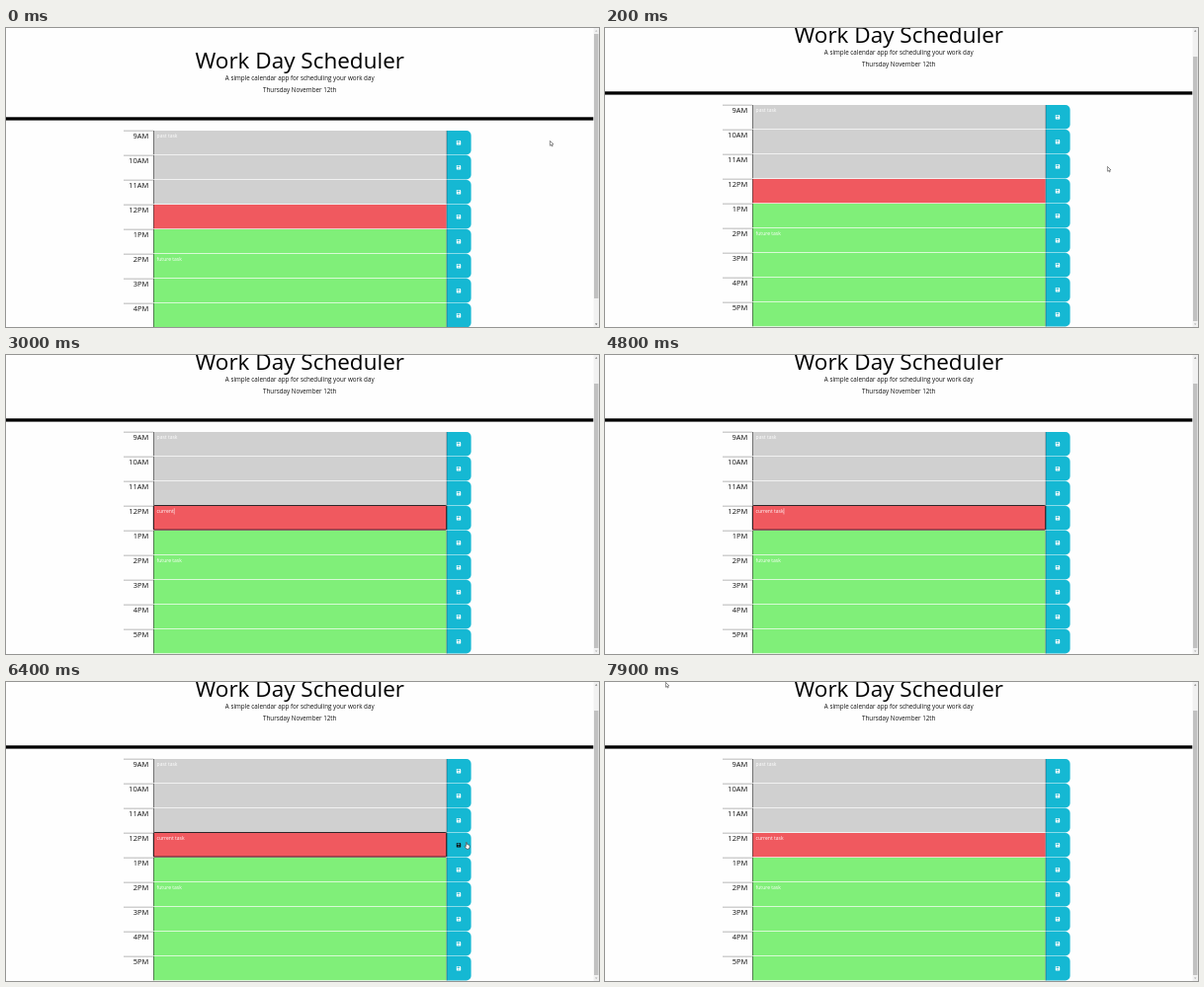
These frames come from a looping animation (600 by 303 pixels, 8000 ms). An HTML page with a canvas:

```html
<!DOCTYPE html>
<html lang="en">
<head>
<meta charset="utf-8">
<title>Work Day Scheduler</title>
<style>
  html, body { margin: 0; width: 100%; height: 100%; overflow: hidden; background: #fefefe; }
  canvas { display: block; width: 600px; height: 303px; }
</style>
</head>
<body>
<canvas id="stage"></canvas>
<script>
const W = 600, H = 303, LOOP = 8000;
const canvas = document.getElementById("stage");
const ctx = canvas.getContext("2d");
const dpr = window.devicePixelRatio || 1;
canvas.width = W * dpr;
canvas.height = H * dpr;

const COLOR = {
  page: "#fefefe", past: "#d0d0d0", present: "#f0595f",
  future: "#80ef79", save: "#15b8d3", ink: "#111"
};
const HOURS = ["9AM", "10AM", "11AM", "12PM", "1PM", "2PM", "3PM", "4PM", "5PM"];
const NOW_ROW = 3, ROW_H = 25, FIRST_ROW = 104;
const FIELD = { x: 149, w: 296.6 }, BUTTON = { x: 446, w: 24.6 };
const PAGE_RIGHT = 594.5, PAGE_HEIGHT = 329;

const TASK = "current task";
const KEY_TIMES = [1900, 2100, 2200, 2400, 2500, 2700, 2800, 3200, 3300, 3500, 4100, 4800];
const FOCUS = 1000, BLUR = 6600;

// Pointer stops: time, x, y, shape ("" while it rests inside a text field)
const POINTER = [
  [0, 550, 114, "arrow"], [200, 508, 140, "arrow"], [300, 300, 162, ""],
  [5900, 447, 163, "hand"], [6000, 462, 160, "hand"], [6100, 486, 158, "arrow"],
  [6200, 493, 160, "arrow"], [6300, 474, 162, "arrow"], [6400, 464, 162, "hand"],
  [6600, 462, 162, "hand"], [7400, 447, 156, "hand"], [7500, 340, 105, ""],
  [7600, 215, 52, "arrow"], [7700, 128, 20, "arrow"], [7800, 78, 5, "arrow"],
  [7900, 61, 0, "arrow"]
];

function rect(x, y, w, h, color) {
  ctx.fillStyle = color;
  ctx.fillRect(x, y, w, h);
}

function text(str, x, y, size, color = COLOR.ink, align = "left") {
  ctx.font = `${size}px "Open Sans", sans-serif`;
  ctx.textAlign = align;
  ctx.fillStyle = color;
  ctx.fillText(str, x, y);
}

function poly(points, fill, stroke) {
  ctx.beginPath();
  points.forEach(([x, y]) => ctx.lineTo(x, y));
  ctx.closePath();
  ctx.fillStyle = fill;
  ctx.fill();
  if (!stroke) return;
  ctx.strokeStyle = stroke;
  ctx.lineWidth = 0.6;
  ctx.stroke();
}

function scrollAt(t) {
  return t < 100 ? 0 : t < 200 ? 20 : 26;
}

function pointerAt(t) {
  return POINTER.filter(p => p[0] <= t).pop();
}

function drawHeader() {
  text("Work Day Scheduler", 297.2, 41, 22.5, "#000", "center");
  text("A simple calendar app for scheduling your work day", 297.2, 52.9, 6.25, COLOR.ink, "center");
  text("Thursday November 12th", 297.2, 64.5, 6.25, COLOR.ink, "center");
  rect(0, 90.3, PAGE_RIGHT, 3.3, "#000");
}

function drawSave(y, hover) {
  const { x, w } = BUTTON;
  ctx.beginPath();
  ctx.roundRect(x, y, w, 24.5, [0, 4.7, 4.7, 0]);
  ctx.fillStyle = COLOR.save;
  ctx.fill();
  rect(x - 0.3, y, 0.5, 24.5, "#234");

  const cx = 458, cy = y + 12.2;
  ctx.beginPath();
  ctx.roundRect(cx - 2.2, cy - 2.2, 4.4, 4.4, [0.5, 1, 0.5, 0.5]);
  ctx.fillStyle = hover ? "#111" : "#fff";
  ctx.fill();
  rect(cx - 1.5, cy - 1.6, 2.6, 1.2, COLOR.save);
  ctx.beginPath();
  ctx.arc(cx, cy + 0.9, 0.65, 0, Math.PI * 2);
  ctx.fill();
}

function caretOn(t) {
  if (t < FOCUS || t >= BLUR) return false;
  const lastKey = KEY_TIMES.filter(k => k <= t).pop() || FOCUS;
  return (t - lastKey) % 1000 < 500;
}

function drawRow(i, t, hover) {
  const y = FIRST_ROW + i * ROW_H;
  const state = i < NOW_ROW ? "past" : i === NOW_ROW ? "present" : "future";
  rect(119, y - 0.2, 30, 0.6, "#888");
  text(HOURS[i], 144.2, y + 7.6, 7.5, COLOR.ink, "right");
  rect(FIELD.x, y, FIELD.w, 24.3, COLOR[state]);
  rect(FIELD.x, y, 0.6, 24.3, "#333");
  drawSave(y, hover);

  const typed = TASK.slice(0, KEY_TIMES.filter(k => k <= t).length);
  const note = i === 0 ? "past task" : i === 5 ? "future task" : i === NOW_ROW ? typed : "";
  text(note, 152.6, y + 7.2, 5, "#fff");
  if (i !== NOW_ROW) return;

  if (caretOn(t)) {
    rect(152.8 + ctx.measureText(note).width, y + 2.3, 0.5, 6.2, "#fff");
  }
  if (t >= FOCUS && t < BLUR) {
    ctx.beginPath();
    ctx.roundRect(FIELD.x + 0.3, y - 0.5, FIELD.w - 0.2, 24.6, 0.8);
    ctx.strokeStyle = "#1a1014";
    ctx.lineWidth = 0.9;
    ctx.stroke();
  }
}

function drawScrollbar(scroll) {
  rect(PAGE_RIGHT, 0, W - PAGE_RIGHT, H, "#f1f1f1");
  const track = H - 12;
  rect(595, 6 + scroll * track / PAGE_HEIGHT, 4.4, track * H / PAGE_HEIGHT, "#c1c1c1");
  const end = scroll >= PAGE_HEIGHT - H;
  poly([[596, 3.6], [597.2, 2.2], [598.4, 3.6]], scroll ? "#505050" : "#aaa");
  poly([[596, 299.6], [597.2, 301], [598.4, 299.6]], end ? "#aaa" : "#505050");
}

function drawPointer([, x, y, shape]) {
  if (!shape) return;
  ctx.save();
  ctx.translate(x, y);
  if (shape === "arrow") {
    poly([[0.4, 0.4], [0.4, 5.2], [1.5, 4.3], [2.3, 6], [3.1, 5.6], [2.4, 4], [3.9, 3.9]], "#fff", "#444");
  } else {
    poly([[1.4, 0.6], [2.3, 0.6], [2.5, 2.6], [5, 3.3], [5.2, 5.2], [4.4, 7.2],
      [1.9, 7.2], [0.2, 4.7], [0.5, 4], [1.4, 4.7]], "#fff", "#333");
  }
  ctx.restore();
}

function draw(t) {
  const scroll = scrollAt(t), pointer = pointerAt(t);
  ctx.setTransform(dpr, 0, 0, dpr, 0, 0);
  rect(0, 0, W, H, COLOR.page);
  ctx.save();
  ctx.translate(0, -scroll);
  drawHeader();
  HOURS.forEach((_, i) => drawRow(i, t, i === NOW_ROW && pointer[3] === "hand"));
  ctx.restore();
  drawScrollbar(scroll);
  drawPointer(pointer);
}

const start = performance.now();
function tick() {
  draw((performance.now() - start) % LOOP);
  requestAnimationFrame(tick);
}
tick();
</script>
</body>
</html>
```
